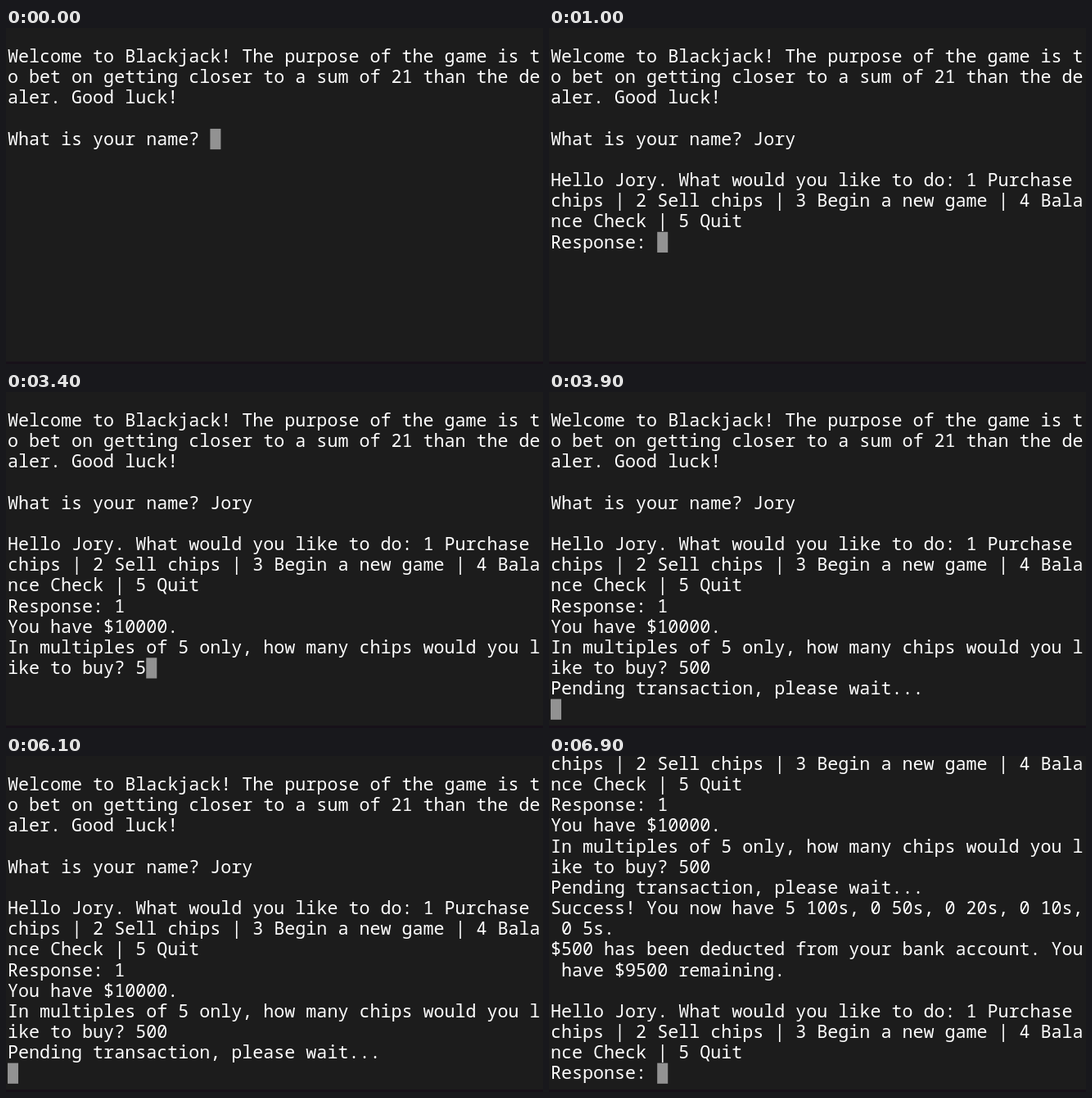
These frames come from a looping animation (656x410 px, 8 s). An HTML page with a canvas:

```html
<!DOCTYPE html>
<html lang="en">
<head>
<meta charset="utf-8">
<title>Blackjack terminal</title>
<style>
  html, body { margin: 0; height: 100%; overflow: hidden; background: #1c1c1c; }
  canvas { display: block; }
</style>
</head>
<body>
<canvas id="screen" width="656" height="410"></canvas>
<script>
const ctx = document.getElementById('screen').getContext('2d');
const LOOP = 8000, COLS = 50, ROWS = 16;
const LEFT = 2, TOP = -2.9, CELL = 13.02, LINE = 25.17, BASELINE = 19.8;

const menu = '\nHello Jory. What would you like to do: 1 Purchase chips | ' +
  '2 Sell chips | 3 Begin a new game | 4 Balance Check | 5 Quit\nResponse: ';

// [time in ms, output appended to the terminal]
const output = [
  [0, '\nWelcome to Blackjack! The purpose of the game is to bet on getting ' +
      'closer to a sum of 21 than the dealer. Good luck!\n\nWhat is your name? '],
  [500, 'J'], [600, 'o'], [700, 'ry'], [800, '\n'],
  [900, menu],
  [2400, '1'],
  [2600, '\nYou have $10000.\nIn multiples of 5 only, how many chips would you like to buy? '],
  [3400, '5'], [3500, '0'], [3600, '0'],
  [3800, '\nPending transaction, please wait...\n'],
  [6800, 'Success! You now have 5 100s, 0 50s, 0 20s, 0 10s, 0 5s.\n' +
         '$500 has been deducted from your bank account. You have $9500 remaining.\n' + menu]
];

// Hard wrap at the terminal width
function wrap(line) {
  const rows = [];
  do {
    rows.push(line.slice(0, COLS));
    line = line.slice(COLS);
  } while (line);
  return rows;
}

function draw(t) {
  const text = output.filter(([at]) => at <= t).map(([, s]) => s).join('');
  const rows = text.split('\n').flatMap(wrap).slice(-ROWS);

  ctx.fillStyle = '#1c1c1c';
  ctx.fillRect(0, 0, 656, 410);
  ctx.fillStyle = '#171119';
  ctx.fillRect(0, 407, 656, 3);

  const last = rows.length - 1;
  ctx.fillStyle = '#929292';
  ctx.fillRect(LEFT + rows[last].length * CELL, TOP + last * LINE, CELL, LINE);

  ctx.fillStyle = '#fff';
  ctx.font = '21.7px "Noto Sans Mono", monospace';
  rows.forEach((row, i) => ctx.fillText(row, LEFT, TOP + i * LINE + BASELINE));
}

function tick() {
  draw(performance.now() % LOOP);
  requestAnimationFrame(tick);
}
tick();
</script>
</body>
</html>
```
